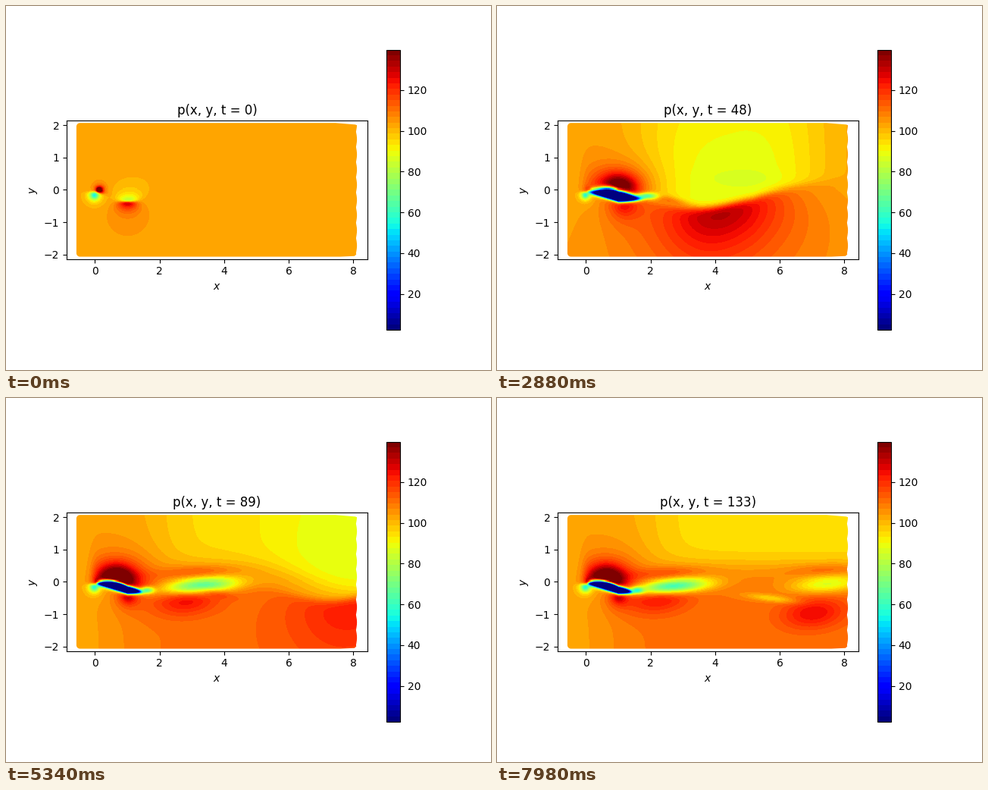
Recreate the animation shown at these times as a matplotlib script. Size 640 by 480 pixels, loop 8000 ms.

```python
from math import cos, exp, pi, tanh

import numpy as np
import matplotlib.pyplot as plt
from matplotlib.animation import FuncAnimation
from matplotlib.cm import ScalarMappable
from matplotlib.colors import Normalize
from matplotlib.path import Path

STEPS = 134
HOLD = 3              # 20 ms ticks per time step
P0 = 103.0            # undisturbed pressure
PERIOD = 52           # steps between shed vortices
FIRST = 60            # first vortex leaves the wing
LEFT, RIGHT, TOP = -0.6, 8.15, 2.09

xs = np.linspace(LEFT, RIGHT, 372, dtype=np.float32)
ys = np.linspace(-TOP, TOP, 178, dtype=np.float32)
X, Y = np.meshgrid(xs, ys)


def sig(v):
    return 0.5 + 0.5 * np.tanh(0.5 * v)


def step(t, mid, width):
    """Smooth switch from 0 to 1 around mid."""
    return 0.5 + 0.5 * tanh(0.5 * (t - mid) / width)


def gauss(x, y, sx, sy, amp, slope=0.0):
    dx = X - x
    return amp * np.exp(-(dx / sx) ** 2 - ((Y - y - slope * dx) / sy) ** 2)


def bump(x, y, bx, by, amp):
    """Round peak with a soft tail."""
    return amp / (1 + ((X - x) / bx) ** 2 + ((Y - y) / by) ** 2) ** 2


def lobe(d, x, amp, width, spread, reach, power):
    """Half of a pressure dipole sitting on the shear line."""
    u = np.abs(X - x) / (width + spread * d)
    return amp * np.exp(-u ** power) / (1 + (d / reach) ** 2)


def starting_vortex(t, fade):
    """Suction above and compression below a shear line that drifts away."""
    grown = 1 - exp(-t / 15)
    wide = grown ** 2
    xc = 1 + 0.05 * t + 0.00033 * t ** 2
    u = X - xc
    trough = (0.28 + 0.22 * wide) * np.exp(-((u + 0.8 * grown ** 3) / 1.7) ** 2)
    d = Y + 0.1 + trough - 0.16 * np.clip(u - 1, 0, 2.5)
    over = sig(d / (0.02 + 0.05 * grown))
    xu = xc + 0.3 * grown
    suction = lobe(np.maximum(d, 0), xu, -14.5 * (2 - grown), 0.25 + 2.7 * wide,
                   0.9 * (1 - grown), 0.2 + 5.5 * grown ** 3, 2 + grown)
    push = lobe(np.maximum(-d, 0), xc, 31, 0.25 + 1.7 * wide, 0.65,
                0.2 + 1.5 * wide, 2)
    suction = suction * sig((X - 0.4) / 0.35)
    suction += gauss(xu + 0.4, 0.35, 1.0, 0.25, -3 * wide)
    return fade * (over * suction + (1 - over) * push), u


def shed_vortex(age):
    """Low-pressure core carried downstream, with its high-pressure sides."""
    x = 1.3 + 0.055 * age + 0.0004 * age ** 2
    y = -0.08 - 0.17 * exp(-age / 25)
    born = 1 - exp(-age / 8)
    p = gauss(x, y, 1.1, 0.13 + 0.15 * (1 - exp(-age / 25)),
              -90 * born * exp(-age / 52), 0.07)
    p += gauss(x - 0.4, y - 0.12 - 0.0105 * age, 1.0, 0.5, 16 * born, 0.08)
    p += gauss(x, y + 0.42, 1.1, 0.2, 8 * born, 0.03)
    p += gauss(x - 1.7, -0.38 - 0.002 * age, 0.8, 0.11, -14 * step(age, 40, 5), -0.12)
    return p


def pressure(t):
    grow = min(t / 36, 1)                 # spin-up of the flow at the wing
    late = min(max((t - 30) / 30, 0), 1)
    swell = 0.5 + 0.5 * cos(2 * pi * (max(t, 32) - 58) / PERIOD)
    fade = step(-t, -88, 9)
    settled = step(t, 72, 6)

    p, u = starting_vortex(t, fade)
    p += P0

    # lasting difference between the two sides of the wake
    side = np.tanh((Y - 0.4 + 0.8 * sig((u + 1.5) / 0.6)) / 0.45)
    p -= settled * side * np.where(side > 0, 9 * sig((X - 2.1) / 0.5),
                                   7 * sig((X - 0.8) / 0.4))
    p += gauss(1.4 + 0.025 * t, -0.33, 0.6, 0.13, 14 * fade * step(t, 30, 4), -0.22)

    # high pressure above and below the wing, suction at the nose
    wing = -0.07 - 0.3 * np.clip(X, 0, 1) + 0.15 * np.clip(X - 1, 0, 1) ** 2
    up = sig((Y - wing) / 0.025)
    p += up * sig((X + 0.12) / 0.08) * bump(
        0.15 + 0.45 * grow + 0.6 * swell, -0.03 + 0.07 * grow,
        0.14 + 0.65 * grow + 0.1 * swell, 0.14 + 0.46 * grow,
        (40 + 42 * grow) * exp(-t / 400) - 30 * swell)
    p += up * bump(0.08, -0.03, 0.1, 0.1, 35)
    under = 0.35 + 0.4 * swell
    p += (1 - up) * bump(1 + 0.25 * swell, -0.42, under, under,
                         late * (26 + 12 * swell))
    nose = 0.2 - 0.05 * swell
    p += (1 - up) * bump(-0.03, -0.17, nose, nose, -50)

    for born in range(FIRST, STEPS, PERIOD):
        if t > born:
            p += shed_vortex(t - born)

    # the attached bubble and its tail
    end = 0.9 + 0.55 * grow + 0.5 * swell
    p += gauss(end + 0.1, -0.28 + 0.12 * swell, 0.2 + 0.2 * swell, 0.1, -45 * grow)
    arch = np.sin(pi * np.clip(X / end, 0, 1)).clip(0) ** (0.8 + 0.8 * swell)
    top = wing + (0.03 + 0.2 * grow + 0.12 * swell) * arch
    core = (sig((Y - wing) / 0.03) * sig((top - Y) / (0.03 + 0.02 * swell))
            * sig((end - X) / 0.06) * sig((X - 0.03) / 0.02))
    core = np.minimum(1.5 * core, 1) * min(t / 8, 1)
    return p * (1 - core) - 8 * core


def outline():
    """Rounded sheet with a slightly scalloped right side."""
    r, left, top, right = 0.11, -0.575, 2.07, 8.115
    arc = np.linspace(0, pi / 2, 8)
    cx, cy = left + r - r * np.sin(arc), top - r + r * np.cos(arc)
    side_y = np.linspace(2.0, -2.0, 160)
    side_x = right - 0.03 * (1 - np.abs(np.sin(pi * (side_y - 1.8) / 0.47)))
    pts = [*zip(cx[::-1], cy[::-1]), (7.45, top), (8.06, top - 0.05),
           *zip(side_x, side_y), (8.04, -top + 0.02), (7.6, -top), *zip(cx, -cy)]
    return Path(pts + [pts[0]])


cmap = plt.get_cmap("jet", 50)
norm = Normalize(2.37, 139.77)
shots = [cmap(norm(pressure(t)), bytes=True) for t in range(STEPS)]

fig, ax = plt.subplots(figsize=(6.4, 4.8), dpi=100)
sheet = ax.imshow(shots[0], extent=(LEFT, RIGHT, -TOP, TOP), origin="lower",
                  interpolation="nearest")
sheet.set_clip_path(outline(), transform=ax.transData)
ax.set_xlim(-0.878, 8.436)
ax.set_ylim(-2.144, 2.144)
ax.set_xticks(range(0, 9, 2))
ax.set_yticks(range(-2, 3))
ax.set_xlabel("$x$")
ax.set_ylabel("$y$")
title = ax.set_title("p(x, y, t = 0)")
fig.colorbar(ScalarMappable(norm, cmap), ax=ax)


def update(i):
    t = min(i // HOLD, STEPS - 1)
    sheet.set_data(shots[t])
    title.set_text(f"p(x, y, t = {t})")
    return sheet, title


anim = FuncAnimation(fig, update, frames=STEPS * HOLD - 2, interval=20,
                     repeat=True, repeat_delay=0, blit=False)
plt.show()
```
